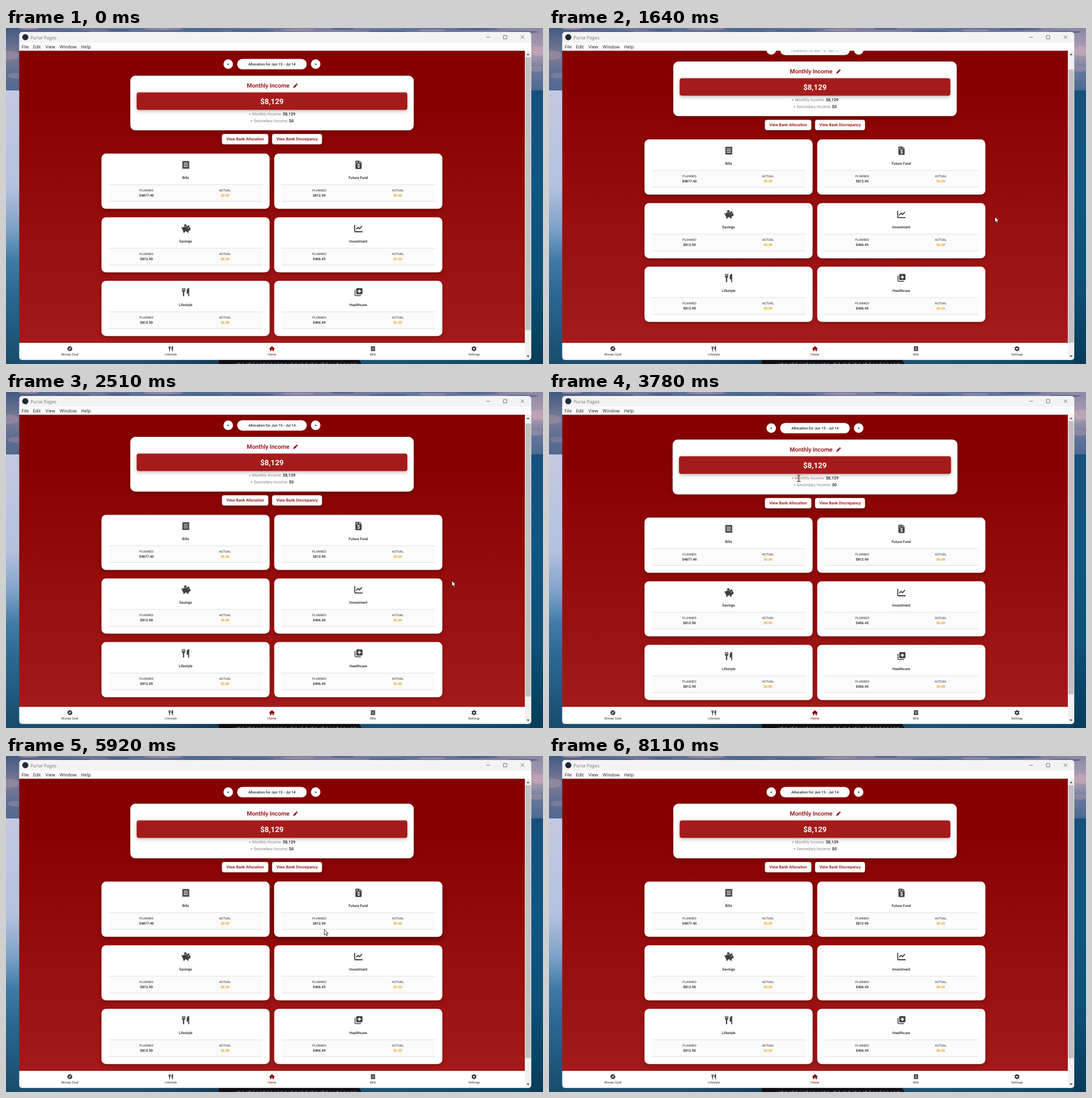
An HTML page for the animation above (8.91 s loop, 946 px wide and 592 px high).

```html
<!DOCTYPE html>
<html lang="en">
<head>
<meta charset="utf-8">
<title>Purse Pages</title>
<style>
  html, body { margin: 0; width: 100%; height: 100%; overflow: hidden; background: #1b4a6a; }
  svg { display: block; width: 946px; height: 592px; }
  text { font-family: Roboto, Arial, sans-serif; text-rendering: geometricPrecision; }
  .ui { font-family: "Open Sans", "Noto Sans", sans-serif; }
  .soft { filter: drop-shadow(0 2px 3px rgba(0,0,0,.3)); }
  .deep { filter: drop-shadow(0 5px 5px rgba(0,0,0,.3)); }
</style>
</head>
<body>
<svg id="stage" viewBox="0 0 946 592" xmlns="http://www.w3.org/2000/svg"></svg>
<script>
const LOOP = 8910, STEP = 66.7, FIRST = 640;
const RED = '#8b0000', DARK = '#40403f', AMBER = '#f39c12';

const rect = (x, y, w, h, fill, r = 0, extra = '') =>
  `<rect x="${x}" y="${y}" width="${w}" height="${h}" rx="${r}" fill="${fill}" ${extra}/>`;
const path = (d, fill = 'currentColor', extra = '') => `<path d="${d}" fill="${fill}" ${extra}/>`;
const line = (d, color, width) => path(d, 'none', `stroke="${color}" stroke-width="${width}"`);
const text = (x, y, size, label, fill = '#222', weight = 500, anchor = 'middle', cls = '') =>
  `<text x="${x}" y="${y}" font-size="${size}" fill="${fill}" font-weight="${weight}" text-anchor="${anchor}" class="${cls}">${label}</text>`;
const gradient = (id, axis, stops) =>
  `<linearGradient id="${id}" ${axis === 'x' ? '' : 'x2="0" y2="1"'}>` +
  stops.map(([at, color]) => `<stop offset="${at}" stop-color="${color}"/>`).join('') + '</linearGradient>';

// Icons are drawn around their own centre.
const icons = {
  receipt: path('M-6-7.3L-4.5-6.2L-3-7.3L-1.5-6.2L0-7.3L1.5-6.2L3-7.3L4.5-6.2L6-7.3V7.3L4.5 6.2L3 7.3L1.5 6.2L0 7.3L-1.5 6.2L-3 7.3L-4.5 6.2L-6 7.3Z') +
    line('M-3.8-3H3.8M-3.8 0H3.8M-3.8 3H3.8', '#fff', 1.1),
  invoice: path('M-4.2-7.4H1.4V-3.7H5.5V6Q5.5 7.4 4.1 7.4H-4.1Q-5.5 7.4-5.5 6V-6Q-5.5-7.4-4.2-7.4ZM2.2-7.4L5.5-4.4H2.2Z') +
    line('M-4-5.2H-1.2M-4-3.2H-1.2', '#fff', .8) + text(0, 5.2, 9, '$', '#fff', 700),
  piggy: path('M-4.5-2.6Q-2.5-4.4 0-4.4H3L6-6V-3.4Q6.8-2.5 7.2-1.2H8.2V3H6.6L5 4.6V7.2H2.2V5.3H-1.6V7.2H-4.4V4.4Q-6.4 2.8-6.3.4Q-8.2.2-8.2-2.2H-7.2Q-7-.8-6-.9Q-5.6-1.9-4.5-2.6Z') +
    '<circle cx="-.8" cy="-5.2" r="2.3" fill="currentColor"/><circle cx="4.6" cy="-.8" r=".8" fill="#fff"/>' +
    line('M-3.5-3.1Q-1-4 2.2-3.2', '#fff', .6),
  chart: line('M-6.7-6.2V4.5Q-6.7 5.8-5.4 5.8H7.2M-4 1.5L-.8-2L1.8.4L6-4.2', 'currentColor', 1.8),
  utensils: path('M-6.5-7.3H-5.5V-3H-4.6V-7.3H-3.4V-3H-2.5V-7.3H-1.3L-.9-3Q-.9-.7-2.8-.2V7.3H-5V-.2Q-6.9-.7-6.9-3ZM6-7.3V7.3H4.1V2.4H1.6V-2Q1.7-6.6 6-7.3Z'),
  medical: rect(-4, -7, 11, 11, 'currentColor', 1.8) +
    line('M-6.2-4V4.6Q-6.2 6.2-4.6 6.2H4.2', 'currentColor', 1.5) + line('M1.5-4.4V1.4M-1.4-1.5H4.4', '#fff', 1.9),
  compass: '<circle r="7" fill="currentColor"/>' + path('M4-4L1.6 1.6L-4 4L-1.6-1.6Z', '#fff') + '<circle r="1.2" fill="currentColor"/>',
  home: path('M0-7.3L8.2 0L7 1.2H5.7V7H1.8V2.5H-1.8V7H-5.7V1.2H-7L-8.2 0Z'),
  gear: '<circle r="4.2" fill="none" stroke="currentColor" stroke-width="3.4"/>' +
    [0, 60, 120].map(a => `<path d="M0-7.5V-4.5M0 4.5V7.5" stroke="currentColor" stroke-width="3.4" transform="rotate(${a})"/>`).join('')
};
const icon = (name, x, y, scale = 1, color = DARK) =>
  `<g transform="translate(${x} ${y}) scale(${scale})" color="${color}">${icons[name]}</g>`;

const cards = [
  ['Bills', 'receipt', '$4877.40'], ['Future Fund', 'invoice', '$812.90'],
  ['Savings', 'piggy', '$812.90'], ['Investment', 'chart', '$406.45'],
  ['Lifestyle', 'utensils', '$812.90'], ['Healthcare', 'medical', '$406.45']
];
const card = ([label, glyph, planned], i) => {
  const x = 168.2 + i % 2 * 304.3, y = 221.3 + (i >> 1) * 112.1;
  return `<g transform="translate(${x} ${y})">` +
    rect(0, 0, 296.2, 97.2, '#fff', 8, `class="deep" id="lift${i}" opacity="0"`) +
    rect(0, 0, 296.2, 97.2, '#fff', 8, 'class="soft"') +
    icon(glyph, 148.5, 19.8) + text(148.2, 44.3, 6.4, label) +
    rect(12.8, 54.5, 271, 30, '#fbfbfb') + line('M12.8 54.6H283.8M12.8 84.2H283.8', '#d9d9de', .8) +
    text(79.2, 66.6, 5.5, 'PLANNED', '#555') + text(79.2, 75.8, 6, planned, '#333', 700) +
    text(217.6, 66.6, 5.5, 'ACTUAL', '#555') + text(217.6, 75.8, 5.9, '$0.00', AMBER, 700) + '</g>';
};

const button = (x, w, label) => rect(x, 186.8, w, 18.2, '#fff', 4, 'class="soft"') +
  text(x + w / 2, 198.4, 7, label, RED);
const pager = (x, sign) => `<circle cx="${x}" cy="63.6" r="8.4" fill="#fff"/>` + text(x, 66, 7, sign, '#222', 700);
const incomeLine = (y, label, value) =>
  text(468.7, y, 7.1, `${label}: <tspan fill="#333" font-weight="700">${value}</tspan>`, '#8a7f7a', 400);

const income = '<g id="income">' +
  rect(219, 84, 499.3, 96.3, '#fff', 9, 'class="soft"') +
  text(461.8, 104.8, 10.4, 'Monthly Income', RED) +
  `<g transform="translate(509.7 101.8) rotate(45)">${rect(-1.4, -2.2, 2.8, 5.2, RED)}${rect(-1.4, -4.8, 2.8, 2, RED, .7)}${path('M-1.4 3H1.4L0 5.2Z', RED)}</g>` +
  rect(230.2, 113.4, 476.8, 30.8, '#a51b1b', 4, 'class="soft"') +
  text(468.5, 133.6, 13.2, '$8,129', '#fff', 700) +
  incomeLine(153.6, '+ Monthly Income', '$8,129') + incomeLine(166.2, '+ Secondary Income', '$0') + '</g>';

const page = rect(23, 40, 891, 592, 'url(#crimson)') +
  pager(391.5, '&lt;') + rect(407.2, 54.6, 122.6, 18.2, '#fff', 9.1) +
  text(468.5, 66, 6.45, 'Allocation for Jun 15 - Jul 14') + pager(545.5, '&gt;') +
  income + button(380.4, 81.8, 'View Bank Allocation') + button(468.7, 88, 'View Bank Discrepancy') +
  cards.map(card).join('');

const tabs = [['Money Goal', 'compass'], ['Lifestyle', 'utensils'], ['Home', 'home'], ['Bills', 'receipt'], ['Settings', 'gear']];
const nav = rect(23, 554.8, 891, 30, '#fff') + tabs.map(([label, glyph], i) => {
  const x = 112.5 + i * 178, color = label === 'Home' ? RED : '#333';
  return icon(glyph, x, 565, .61, color) + text(x, 576.9, 5.65, label, color, 400);
}).join('');

const menu = [['File', 27.6], ['Edit', 47.4], ['View', 69.5], ['Window', 94.6], ['Help', 132.2]]
  .map(([label, x]) => text(x, 36.2, 7.9, label, '#111', 400, 'start', 'ui')).join('');

const rocks = Array.from({ length: 60 }, (_, i) => {
  const x = 400 + i * 3.7, tone = 50 + (i * 47) % 110;
  return line(`M${x} 592l${1 + i * 7 % 5} -${2 + i * 5 % 5}`, `rgb(${tone},${tone},${tone + 8})`, 1);
}).join('');

const cloud = (x, y, rx, ry, color) => `<ellipse cx="${x}" cy="${y}" rx="${rx}" ry="${ry}" fill="${color}" opacity=".6"/>`;
const clouds = Array.from({ length: 12 }, (_, i) =>
  cloud(40 + i * 79, 1 + i * 5 % 7, 18 + i * 13 % 22, 2, i % 3 ? '#3d587f' : '#b29cb0')).join('') +
  cloud(6, 48, 16, 8, '#a08da4') + cloud(16, 84, 14, 5, '#8d86a0') +
  cloud(938, 40, 14, 9, '#c9a9b6') + cloud(934, 72, 13, 5, '#9d8fa8');

const desktop = rect(0, 0, 946, 592, 'url(#sea)') + rect(0, 0, 946, 8, 'url(#sky)') +
  rect(0, 0, 24, 110, 'url(#duskLeft)') + rect(0, 110, 24, 482, 'url(#left)') +
  rect(924, 0, 22, 110, 'url(#duskRight)') + rect(924, 110, 22, 482, 'url(#right)') + clouds +
  path('M375 592V584H622L626 592Z', '#0d0f14') + rocks;

document.getElementById('stage').innerHTML = '<defs>' +
  gradient('crimson', 'y', [[0, '#850000'], [.15, '#870000'], [1, '#a91e1e']]) +
  gradient('sea', 'x', [[0, '#1d4f70'], [.25, '#234f6d'], [.4, '#173a55'], [.7, '#1d5374'], [1, '#0b4566']]) +
  gradient('sky', 'x', [[0, '#435a80'], [.15, '#6f7796'], [.35, '#4e688f'], [.6, '#7d809f'], [.8, '#5c7096'], [1, '#9a8ea8']]) +
  gradient('duskLeft', 'y', [[0, '#425a80'], [.45, '#7d7c98'], [.7, '#5f6f92'], [1, '#52688f']]) +
  gradient('left', 'y', [[0, '#c3c9e2'], [.35, '#b4c2de'], [.5, '#7fa3c8'], [.62, '#3f7ba6'], [.75, '#2a6791'], [1, '#184c6c']]) +
  gradient('duskRight', 'y', [[0, '#8d88a6'], [.4, '#b09eb2'], [.7, '#66779b'], [1, '#4d6990']]) +
  gradient('right', 'y', [[0, '#17507b'], [.35, '#0e5680'], [.7, '#0d4f75'], [1, '#093c5a']]) +
  '<clipPath id="view"><rect x="23" y="40" width="891" height="515"/></clipPath>' +
  '<clipPath id="frame"><rect x="23.3" y="7" width="902" height="578" rx="5"/></clipPath></defs>' +
  desktop + '<g clip-path="url(#frame)">' +
  rect(23, 7, 903, 19.5, '#f3f3f3') + rect(23, 26, 903, 14.2, '#fff') +
  '<circle cx="34" cy="16.2" r="5.4" fill="#20283a"/>' +
  text(43, 19.7, 8.1, 'Purse Pages', '#777', 400, 'start', 'ui') + menu +
  line('M846 16.3H852.6M876.2 13.2H882.2V19.2H876.2ZM906.8 13.2L912.8 19.2M912.8 13.2L906.8 19.2', '#555', .8) +
  `<g clip-path="url(#view)"><g id="page">${page}</g></g>` + nav +
  rect(914, 40, 12, 545, '#f1f1f1') + path('M917 47.8L919.7 44.8L922.4 47.8Z', '#505050') +
  path('M917 577L919.7 580L922.4 577Z', '#505050') + rect(915, 51.3, 9.4, 481, '#c1c1c1', 0, 'id="thumb"') + '</g>' +
  '<g id="cursor"><g id="arrow">' +
  path('M.4.4V10.4L2.7 8.3L4.3 11.9L6 11.1L4.4 7.7H7.6Z', '#fff', 'stroke="#301313" stroke-width=".9"') + '</g>' +
  '<g id="beam">' + line('M-3.2-5.4H3.2M-3.2 5.4H3.2M0-5.4V5.4', '#6b3f35', 1.4) + '</g></g>';

// Linear interpolation through [time, value, value...] keys.
function at(keys, t) {
  if (t <= keys[0][0]) return keys[0].slice(1);
  const next = keys.findIndex(key => key[0] > t);
  if (next < 0) return keys[keys.length - 1].slice(1);
  const a = keys[next - 1], b = keys[next], p = (t - a[0]) / (b[0] - a[0]);
  return a.slice(1).map((v, i) => v + (b[i + 1] - v) * p);
}

const scrollKeys = [[1507, 0], [1574, 4], [1640, 24.8], [1707, 42], [1773, 46.6],
  [2375, 46.6], [2441, 22], [2508, 4.8], [2574, 0]];
const scaleKeys = [[3670, 1], [3775, 1.005], [3980, 1.02], [4360, 1.02], [4620, 1]];
const cursorKeys = [[640, 916, 571], [770, 880, 505], [910, 828, 400], [1040, 791, 342], [1106, 785, 332],
  [3110, 785, 332], [3775, 440, 152], [3900, 396, 134], [4050, 368, 128], [4360, 350, 165],
  [4620, 332, 225], [4980, 325, 284], [5250, 368, 298], [5600, 480, 304], [5912, 561, 305],
  [6200, 588, 335], [6500, 580, 415], [6845, 560, 490], [7150, 610, 515], [7450, 730, 548],
  [7780, 852, 576], [8050, 909, 589]];
const hovers = [[1, 3170, 3520], [0, 4600, 5530], [1, 5580, 6250], [3, 6190, 6540], [5, 6640, 7480]];
const fade = x => Math.max(0, Math.min(1, x / 250));

const el = id => document.getElementById(id);
const parts = Object.fromEntries(['page', 'thumb', 'income', 'cursor', 'arrow', 'beam'].map(id => [id, el(id)]));
const lifts = cards.map((_, i) => el('lift' + i));

function draw(time) {
  const t = FIRST + Math.floor((time - FIRST) / STEP + .1) * STEP;
  const [scroll] = at(scrollKeys, t), [scale] = at(scaleKeys, t), [x, y] = at(cursorKeys, t);
  parts.page.setAttribute('transform', `translate(0 ${-scroll})`);
  parts.thumb.setAttribute('y', 51.3 + scroll * .88);
  parts.income.setAttribute('transform', `translate(468.6 132.2) scale(${scale}) translate(-468.6 -132.2)`);
  lifts.forEach((lift, i) => lift.setAttribute('opacity', hovers.reduce((sum, [index, start, end]) =>
    index === i ? Math.max(sum, fade(t - start) - fade(t - end)) : sum, 0)));
  const overText = t > 3000 && x > 427 && x < 510 && y > 146 && y < 170;
  parts.cursor.setAttribute('transform', `translate(${x} ${y})`);
  parts.cursor.setAttribute('display', t > 639 && t < 8100 ? 'inline' : 'none');
  parts.arrow.setAttribute('display', overText ? 'none' : 'inline');
  parts.beam.setAttribute('display', overText ? 'inline' : 'none');
}

const began = performance.now();
function tick() {
  draw((performance.now() - began) % LOOP);
  requestAnimationFrame(tick);
}
tick();
</script>
</body>
</html>
```
